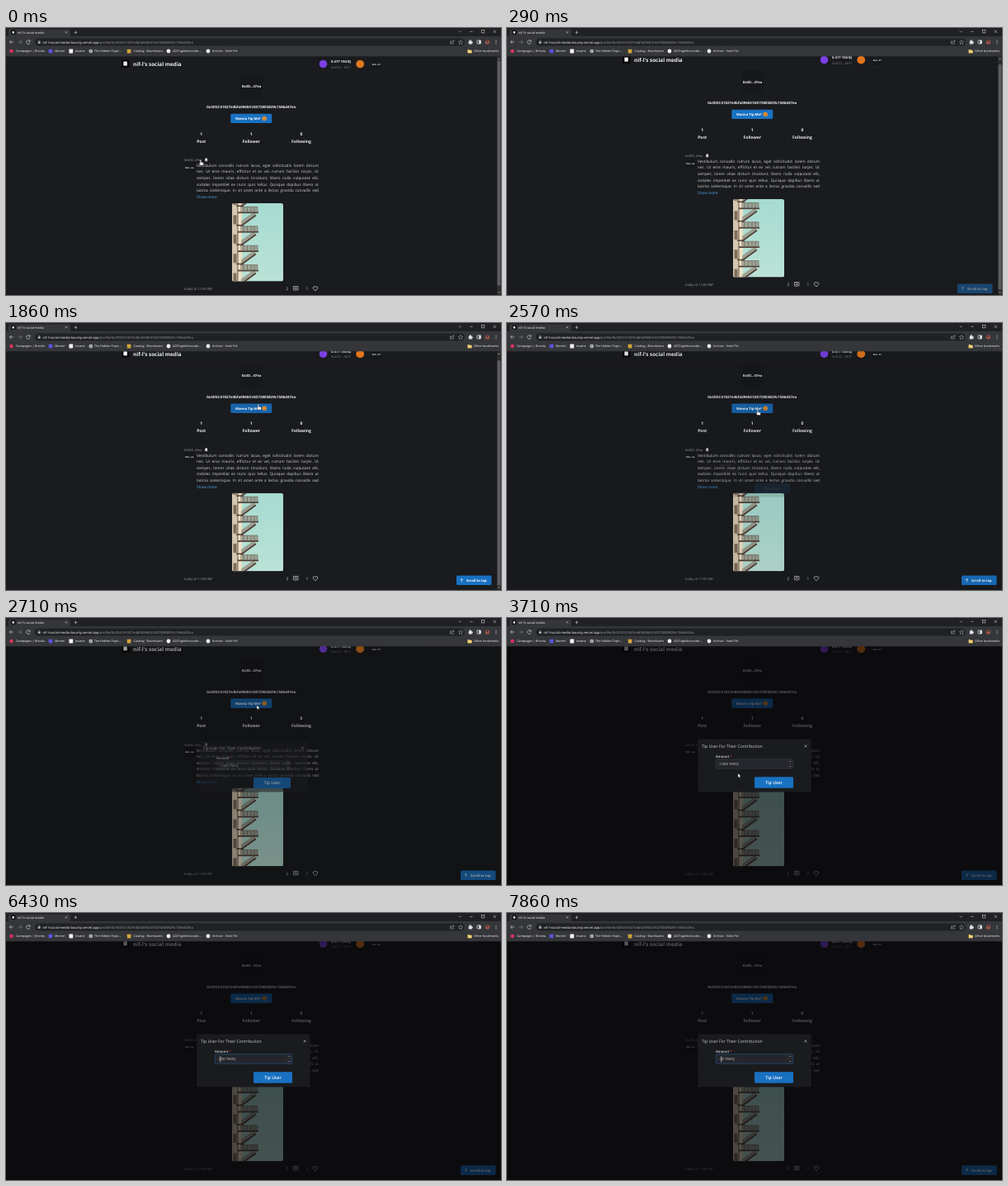
An HTML page for the animation above (8000 ms loop, 600 by 323 pixels).

```html
<!DOCTYPE html>
<html lang="en">
<head>
<meta charset="utf-8">
<title>Tip a user</title>
<style>
  html, body { margin: 0; width: 100%; height: 100%; overflow: hidden; background: #1a1b1e; }
  svg { display: block; width: 100vw; height: 100vh; }
  text, .para { font-family: "Open Sans", "Noto Sans", sans-serif; text-rendering: geometricPrecision; white-space: pre; }
  .para { font-size: 15px; line-height: 24.4px; color: #d3d4d7; }
  .para div { text-align: justify; text-align-last: justify; white-space: nowrap; }
</style>
</head>
<body>
<svg id="stage" viewBox="0 0 600 323" xmlns="http://www.w3.org/2000/svg"></svg>
<script>
const LOOP = 8000;
const WALLET = '0x3D5C61827e4bfa096041AD728E5B29c1586d47ea';
const SITE = "nif-l's social media";
const COIN = 'TAVIQ';
const LIGHT = '#eeeff1', GREY = '#94979d', BLUE = '#1971c2', TILE = '#17181b';

const text = (x, y, str, size, fill = LIGHT, weight = 400, extra = '') =>
  `<text x="${x}" y="${y}" font-size="${size}" fill="${fill}" font-weight="${weight}" ${extra}>${str}</text>`;
const mid = (x, y, str, size, fill = LIGHT, weight = 700) =>
  text(x, y, str, size, fill, weight, 'text-anchor="middle"');
const rect = (x, y, w, h, fill, r = 0, extra = '') =>
  `<rect x="${x}" y="${y}" width="${w}" height="${h}" fill="${fill}" rx="${r}" ${extra}/>`;
const dot = (x, y, r, fill) => `<circle cx="${x}" cy="${y}" r="${r}" fill="${fill}"/>`;
const line = (d, stroke = '#d5d7da', w = .6, fill = 'none') =>
  `<path d="${d}" stroke="${stroke}" stroke-width="${w}" fill="${fill}" stroke-linejoin="round"/>`;
const cross = (x, y, r, color, w) =>
  line(`M${x - r} ${y - r}l${2 * r} ${2 * r}m0 ${-2 * r}l${-2 * r} ${2 * r}`, color, w);
const times = (n, fn) => Array.from({ length: n }, (_, i) => fn(i)).join('');

function browser() {
  const marks = [
    [12, 'Campaigns | Brivola', dot(6.5, 28, 2.3, '#d8315b')],
    [59, 'Mornel', rect(51.7, 25.7, 4.6, 4.6, '#5a55e0', .6)],
    [84, 'tovane', rect(76.4, 25.6, 4.8, 4.8, '#f1f1f1', .6)],
    [107, 'The Hidden Topic...', dot(102.8, 28, 2.3, '#dfe1e5') +
      line('M100.8 27.2h4M100.8 28.8h4M102.8 25.8v4.4', '#35363a', .4)],
    [154.5, 'Catalog - Bramluxers', rect(146.8, 25.8, 4.6, 4.6, '#d0a53a', .4)],
    [202, '4207qplek/vscode-...', dot(197, 28, 2.4, '#f0f0f0')],
    [250, 'Archive - Vonk Pel', dot(245, 28, 2.4, '#e8eaed')]
  ];
  return rect(0, 0, 600, 10.5, '#202124') + rect(0, 10, 600, 24.3, '#35363a') +
    rect(3, 1.4, 75, 10, '#35363a', 2) +
    rect(6.3, 2.8, 5, 5, '#08090a') + rect(7.6, 4, 2.4, 2.6, '#eee') +
    text(14, 6.5, SITE, 3.75, '#f4f5f6', 500) + cross(73, 5.3, 1.1, '#dfe1e5', .5) +
    line('M82.6 5.3h3.8M84.5 3.4v3.8', '#dfe1e5', .55) +
    line('M548.7 3.6l1.5 1.5l1.5-1.5M562.3 4.4h3.4', '#dfe1e5', .5) +
    rect(576.7, 2.7, 3.2, 3.2, 'none', 0, 'stroke="#dfe1e5" stroke-width=".5"') +
    cross(592.3, 4.3, 1.7, '#dfe1e5', .5) +
    line('M9 17H4.4M6.5 14.8L4.3 17l2.2 2.2', '#dfe1e5') +
    line('M14.6 17h4.6M17 14.8l2.2 2.2l-2.2 2.2', '#85878b') +
    line('M28.9 15.7A2.3 2.3 0 1 0 29.2 17.8M29.2 14.6v1.7h-1.7', '#dfe1e5') +
    rect(35, 12.4, 521, 9.2, '#202124', 4.6) +
    rect(38.8, 16.5, 2.8, 2.3, '#bdc1c6', .3) + line('M39.3 16.6v-.8a.9.9 0 0 1 1.8 0v.8', '#bdc1c6', .4) +
    text(44.5, 18.6, `nif-l-social-media-bounty.vercel.app<tspan fill="#9b9ea3" font-weight="400">/profile/${WALLET}</tspan>`, 4.1, '#fff', 500) +
    line('M540 16h-1.5v3h4v-1M540 18q0-2.4 3-2.4M541.8 14.4l1.5 1.2l-1.5 1.3', '#bdc1c6', .5) +
    line('M551 14.5l.8 1.7l1.9.2l-1.4 1.3l.4 1.9l-1.7-1l-1.7 1l.4-1.9l-1.4-1.3l1.9-.2z', '#bdc1c6', .45) +
    rect(560.8, 15.5, 4, 4, '#dfe1e5', .5) + dot(562.7, 15.2, .9, '#dfe1e5') + dot(565, 17.5, .9, '#dfe1e5') +
    rect(571, 15, 4.4, 4, 'none', .4, 'stroke="#e8eaed" stroke-width=".7"') + rect(573.3, 15, 2.1, 4, '#e8eaed') +
    dot(583.5, 17, 2.6, '#a2564a') + dot(583.5, 16.3, 1, '#332628') +
    times(3, i => dot(594, 15.3 + i * 1.7, .5, '#dfe1e5')) +
    marks.map(([x, label, icon]) => icon + text(x, 29.4, label, 3.7, '#f4f5f6', 500)).join('') +
    line('M559.7 26.2h1.8l.6.7h2.4v3.3h-4.8z', '#e9c766', .3, '#f3d377') +
    text(567, 29.4, 'Other bookmarks', 3.7, '#f4f5f6', 500);
}

// A pale wall on the left with a fire escape zigzagging down against the sky.
function photo() {
  const rust = '#54423a', shadow = '#8d7766';
  const flight = i => {
    const y = 199 + i * 23.4;
    return rect(275.5, y + 4, 4, 11, '#7e6c5c') +
      `<path d="M284 ${y - 6}h21v6h-21z" fill="${shadow}" opacity=".55"/>` +
      line(`M284 ${y - 6}h21v6M288 ${y - 6}v6M292.5 ${y - 6}v6M297 ${y - 6}v6M301 ${y - 6}v6`, rust, .5) +
      `<path d="M302 ${y + 4}L285 ${y + 17}v-6L302 ${y - 1}z" fill="${shadow}" opacity=".6"/>` +
      line(`M303 ${y + 4}L285 ${y + 17}`, rust, 1.8) +
      rect(281, y, 25, 1.8, rust) + rect(279, y + 15.5, 9, 1.5, rust);
  };
  return `<g clip-path="url(#photoClip)">${rect(274, 212, 62, 94.5, 'url(#sky)')}` +
    rect(274, 212, 9, 94.5, '#d3c7ae') + rect(282, 212, 4, 94.5, '#eee2c6') +
    rect(280.2, 212, 1.3, 94.5, '#8d7b69') + `${times(6, flight)}</g>`;
}

function page() {
  const lines = [
    'Vestibulum convallis rutrum lacus, eget sollicitudin lorem dictum',
    'nec. Ut eros mauris, efficitur et ex vel, rutrum facilisis turpis. Ut',
    'semper, lorem vitae dictum tincidunt, libero nulla vulputate elit,',
    'sodales imperdiet ex nunc quis tellus. Quisque dapibus libero ut',
    'lacinia scelerisque. In sit amet ante a lectus gravida convallis sed'
  ];
  const stats = [[236.7, 1, 'Post'], [297.3, 1, 'Follower'], [358, 0, 'Following']];
  return rect(0, 52.6, 595, .4, '#232529') +
    rect(140, 38.5, 9.5, 9.5, '#060708', .8) + rect(142.4, 40.6, 4.4, 5, '#f3f3f3') +
    text(154, 46.2, SITE, 6.4, LIGHT, 700) +
    dot(384.5, 43.5, 4.8, '#7b3fe4') +
    text(394, 42.4, `0.477 ${COIN}`, 4.2, LIGHT, 700) + text(394, 48.6, '0x4C61...8E37', 3.7, '#777a80') +
    dot(429.2, 43.6, 4.9, '#e2761b') +
    rect(442.5, 37.6, 12.5, 12.5, TILE, 1) + mid(448.8, 44.8, '0x4...37', 2.7) +
    rect(284, 56.6, 27, 27, TILE, 1) + mid(297.5, 71.6, '0x3D...47ea', 4.2) +
    mid(297.3, 96.9, WALLET, 4.4) +
    rect(272.3, 103.7, 50, 11.4, BLUE, 1.3, 'id="tip"') +
    text(278, 110.9, 'Wanna Tip Me?', 4.1, '#fff', 700) +
    dot(313.2, 109.4, 2.7, '#e9932f') + dot(312.2, 108.8, .4, '#5a3212') + dot(314.2, 108.8, .4, '#5a3212') +
    line('M311.9 110.5q1.3 1 2.6 0', '#5a3212', .4) +
    stats.map(([x, n, label]) => mid(x, 129.6, n, 5) + mid(x, 138.6, label, 5)).join('') +
    text(216, 160.8, '0x3D5..47ea', 3.7, '#a5a8ad') +
    line('M241 160.6q.6-.6.6-2a1.1 1.1 0 0 1 2.2 0q0 1.4.6 2z', LIGHT, .3, LIGHT) + dot(242.7, 161.2, .5, LIGHT) +
    rect(216, 162, 12.5, 12.5, TILE, 1) + mid(222.2, 169.6, '0x3...ea', 2.7) +
    `<g transform="translate(231 162.4) scale(.3125)"><foreignObject width="473.6" height="130">
      <div xmlns="http://www.w3.org/1999/xhtml" class="para">${lines.map(l => `<div>${l}</div>`).join('')}</div>
    </foreignObject></g>` +
    text(231, 205.8, 'Show more', 4.7, '#4dabf7') + photo() +
    text(216, 317, 'today at 11:00 AM', 4.2, GREY, 400, 'font-style="italic"') +
    text(339.5, 317, 2, 4.8, '#d3d4d7') +
    line('M348.4 312.6h5.6v4.2h-2l-1 1.2l-1-1.2h-1.6zM349.7 314h3M349.7 315.4h3', '#d5d7da', .65) +
    text(363.5, 317, 1, 4.8, '#d3d4d7') +
    line('M375 318l-2.4-2.5a1.6 1.6 0 0 1 2.4-2.2a1.6 1.6 0 0 1 2.4 2.2z', '#d5d7da', .7);
}

const scrollButton = () =>
  rect(546, 305.6, 42.5, 11.4, BLUE, 1.3) +
  line('M552.4 313.2v-3.8M550.8 311l1.6-1.6l1.6 1.6', '#fff', .6) +
  text(558, 312.8, 'Scroll to top', 4.1, '#fff', 700);

const scrollbar = () =>
  rect(595, 34.3, 5, 288.7, '#2b2c2e') + rect(595.6, 39.5, 3.8, 272, '#5c5d60', 0, 'id="thumb"') +
  line('M596.4 37.9l1.1-1.3l1.1 1.3zM596.4 319.6l1.1 1.3l1.1-1.3z', '#9a9b9d', .2, '#9a9b9d');

const modal = () =>
  rect(231.3, 146.6, 137.4, 64, '#1a1b1e', 1.2) +
  text(236, 157, 'Tip User For Their Contribution', 5.1, '#d0d1d4') +
  cross(362, 155, 1.5, '#c5c7ca', .6) +
  text(253, 169, 'Amount<tspan fill="#e03131"> *</tspan>', 4.2, '#d5d6d9', 600) +
  rect(253.2, 170.7, 93.6, 11.5, '#25262b', 1, 'id="field" stroke-width=".6"') +
  line('M339.6 171v11M339.6 176.5h7', '#373a40', .4) +
  line('M342.2 174.1l1.2-1.2l1.2 1.2M342.2 178.9l1.2 1.2l1.2-1.2', '#c1c2c5', .5) +
  '<text id="amount" x="257" y="178.4" font-size="4.3" fill="#d0d1d4"></text>' +
  rect(300, 192.2, 47, 13.6, BLUE, 1.3) + mid(323.5, 201, 'Tip User', 5.2, '#fff', 600);

const cursors =
  '<g id="hand">' +
  line('M-.8 0a.7.7 0 0 1 1.4 0v2.3l2.2.5q.7.2.6 1l-.4 2.3h-3.2L-2.4 3.6q.4-.8 1.6.2z', '#222', .4, '#fff') + '</g>' +
  '<g id="arrow">' + line('M0 0v5l1.2-1.1l.8 1.7l.8-.4l-.8-1.6h1.6z', '#222', .35, '#fff') + '</g>' +
  '<g id="beam">' + line('M-1-2.8h2M0-2.8v5.6M-1 2.8h2', '#d5d7da', .5) + '</g>';

const stage = document.getElementById('stage');
stage.innerHTML = `<defs>
  <linearGradient id="sky" x2="0" y2="1"><stop stop-color="#a6dbd1"/><stop offset="1" stop-color="#bbe2d6"/></linearGradient>
  <clipPath id="photoClip"><rect x="274" y="212" width="62" height="94.5" rx="2.6"/></clipPath></defs>
  ${rect(0, 0, 600, 323, '#1a1b1e')}
  <g id="page">${page()}</g><g id="toTop">${scrollButton()}</g>
  <g id="bar">${scrollbar()}</g>
  ${rect(0, 34, 600, 289, '#060608', 0, 'id="shade"')}
  <g id="modal">${modal()}</g>${browser()}${cursors}`;

const el = id => document.getElementById(id);
const set = (id, attrs) => { for (const k in attrs) el(id).setAttribute(k, attrs[k]); };

// Each step overrides only what changes from its time on.
const steps = [
  [0, { cursor: 'hand', x: 236, y: 160, scroll: 0, top: 0, hover: 0, open: 0, focus: 0, amount: '1.000' }],
  [140, { scroll: 2 }],
  [290, { scroll: 5, top: .5, cursor: '' }],
  [430, { scroll: 6.2, top: 1 }],
  [1570, { cursor: 'arrow', x: 350, y: 114 }],
  [1710, { x: 325, y: 104 }],
  [1860, { cursor: 'hand', x: 306, y: 99, hover: 1 }],
  [2000, { x: 305, y: 103 }],
  [2140, { x: 304, y: 105.5 }],
  [2570, { open: .12 }],
  [2710, { open: .57, cursor: 'arrow' }],
  [2860, { open: 1, hover: 0 }],
  [3140, { x: 294, y: 155 }],
  [3290, { x: 280, y: 188 }],
  [4290, { x: 269, y: 184 }],
  [4710, { cursor: 'beam', x: 259.8, y: 176.8 }],
  [5140, { focus: .4 }],
  [5290, { focus: 1 }],
  [5860, { amount: '.000' }],
  [7430, { amount: '.00' }]
];

function render(now) {
  const s = {};
  for (const [t, change] of steps) if (t <= now) Object.assign(s, change);
  set('page', { transform: `translate(0 ${-s.scroll})` });
  set('thumb', { y: 39.5 + s.scroll * .95 });
  set('tip', { fill: s.hover ? '#1864ab' : BLUE });
  set('toTop', { opacity: s.top, transform: `translate(${s.open ? 5 : 0} ${(1 - s.top) * 8})` });
  set('bar', { opacity: s.open ? 0 : 1 });
  set('shade', { opacity: s.open * .65 });
  set('modal', {
    opacity: s.open,
    transform: `translate(300 ${178.6 + 3.1 * (1 - s.open)}) scale(${.9 + .1 * s.open}) translate(-300 -178.6)`
  });
  set('field', { stroke: s.focus === 1 ? '#1c5c99' : s.focus ? '#49617c' : '#373a40' });
  el('amount').textContent = `${s.amount} ${COIN}`;
  for (const c of ['hand', 'arrow', 'beam'])
    set(c, { transform: `translate(${s.x} ${s.y})`, visibility: c === s.cursor ? 'visible' : 'hidden' });
}

const start = performance.now();
function tick() {
  render((performance.now() - start) % LOOP);
  requestAnimationFrame(tick);
}
tick();
</script>
</body>
</html>
```
